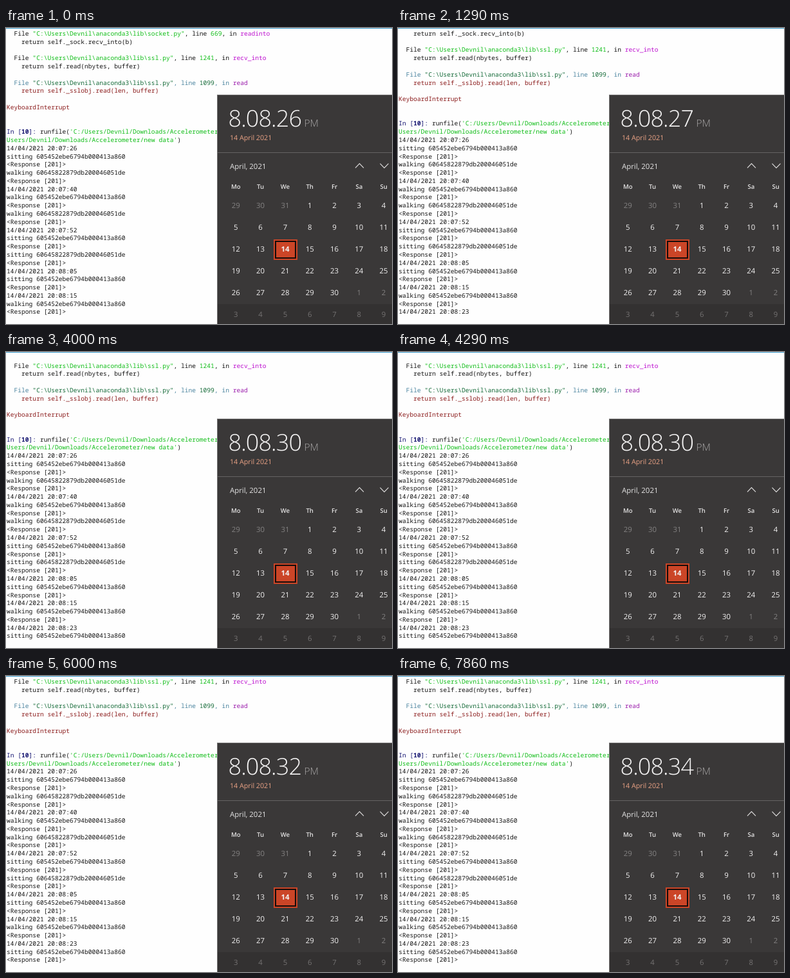
Recreate the animation shown at these times as an HTML page with a canvas. Size 600 by 462 pixels, loop 8000 ms.

```html
<!DOCTYPE html>
<html lang="en">
<head>
<meta charset="utf-8">
<title>Console and calendar</title>
<style>
html, body { margin: 0; width: 100%; height: 100%; overflow: hidden; background: #fefefe; }
canvas { display: block; }
</style>
</head>
<body>
<canvas id="stage" width="600" height="462"></canvas>
<script>
const ctx = document.getElementById('stage').getContext('2d');
ctx.textRendering = 'geometricPrecision';

const LOOP = 8000;
const LINE_HEIGHT = 12.78;
const LAST_BASELINE = 446.4;
const MONO = '9.62px "Noto Sans Mono", monospace';
const SANS = '"Open Sans", sans-serif';
const BLACK = '#151515', GREEN = '#10bd18', PURPLE = '#bd12cf', RED = '#8b1c1c', NAVY = '#10106e';
const PLAIN = { text: BLACK, path: GREEN, name: PURPLE };
const LAST_CALL = { text: '#4b849f', path: '#146a38', name: '#9a1cab' };

// A console line is a list of [text, color, bold] runs.
const plain = (text, color = BLACK) => [[text, color]];
const trace = (file, line, name, style) => [
  ['  File ', style.text],
  [`"C:\\Users\\Devnil\\anaconda3\\lib\\${file}"`, style.path],
  [', line ', style.text], [String(line), style.path],
  [', in ', style.text], [name, style.name]
];

const DEVICE_A = '605452ebe6794b000413a860';
const DEVICE_B = '60645822879db200046051de';
const reading = (time, ...entries) => [
  plain('14/04/2021 20:' + time),
  ...entries.flatMap(entry => [plain(entry), plain('<Response [201]>')])
];

const consoleLines = [
  trace('socket.py', 669, 'readinto', PLAIN),
  plain('    return self._sock.recv_into(b)'),
  [],
  trace('ssl.py', 1241, 'recv_into', PLAIN),
  plain('    return self.read(nbytes, buffer)'),
  [],
  trace('ssl.py', 1099, 'read', LAST_CALL),
  plain('    return self._sslobj.read(len, buffer)', RED),
  [],
  plain('KeyboardInterrupt', RED),
  [], [],
  [['In [', NAVY], ['10', NAVY, true], [']: ', NAVY], ['runfile(', BLACK],
   ["'C:/Users/Devnil/Downloads/Accelerometer", GREEN]],
  [['Users/Devnil/Downloads/Accelerometer/new data\'', GREEN], [')', BLACK]],
  ...reading('07:26', 'sitting ' + DEVICE_A, 'walking ' + DEVICE_B),
  ...reading('07:40', 'walking ' + DEVICE_A, 'walking ' + DEVICE_B),
  ...reading('07:52', 'sitting ' + DEVICE_A, 'sitting ' + DEVICE_B),
  ...reading('08:05', 'sitting ' + DEVICE_A),
  ...reading('08:15', 'walking ' + DEVICE_A),
  ...reading('08:23', 'sitting ' + DEVICE_A)
];
const printTimes = [1000, 3900, 6000];

function write(text, x, y, font, color, align = 'left') {
  ctx.font = font;
  ctx.fillStyle = color;
  ctx.textAlign = align;
  ctx.fillText(text, x, y);
}

function fill(color, x, y, w, h) {
  ctx.fillStyle = color;
  ctx.fillRect(x, y, w, h);
}

function drawConsole(time) {
  const pending = printTimes.filter(at => time < at).length;
  const visible = consoleLines.slice(0, consoleLines.length - pending);
  visible.reverse().forEach((runs, row) => {
    const y = LAST_BASELINE - row * LINE_HEIGHT;
    if (y < 5) return;
    let x = 1;
    for (const [text, color, bold] of runs) {
      write(text, x, y, (bold ? 'bold ' : '') + MONO, color);
      x += ctx.measureText(text).width;
    }
  });
  fill('#3f9dce', 0, 0, 600, 1);
}

function drawChevron(x, y, rise) {
  ctx.beginPath();
  ctx.moveTo(x - 6.5, y + rise);
  ctx.lineTo(x, y - rise);
  ctx.lineTo(x + 6.5, y + rise);
  ctx.strokeStyle = '#dedddd';
  ctx.lineWidth = 1.2;
  ctx.stroke();
}

function drawDays() {
  const columnX = column => 357.3 + column * 38.3;
  ['Mo', 'Tu', 'We', 'Th', 'Fr', 'Sa', 'Su'].forEach((day, column) =>
    write(day, columnX(column), 250.5, '600 9.6px ' + SANS, '#e3e2e2', 'center'));

  fill('#cb4527', 416, 330, 37, 32);
  fill('#160c0a', 418, 332, 33, 28);
  fill('#cb4527', 420, 334, 29, 24);

  for (let cell = 0; cell < 42; cell++) {
    const date = new Date(2021, 2, 29 + cell);
    const row = Math.floor(cell / 7);
    const day = date.getDate();
    const inMonth = date.getMonth() === 3;
    const today = inMonth && day === 14;
    const color = inMonth ? '#f2f1f1' : row === 5 ? '#747272' : '#838181';
    write(day, columnX(cell % 7), 281 + row * 34,
      (today ? 'bold ' : '') + '11.4px ' + SANS, color, 'center');
  }
}

function drawCalendar(time) {
  fill('#777575', 328, 104, 272, 358);
  fill('#3a3838', 329, 105, 271, 357);
  fill('#333131', 329, 431, 271, 31);

  const seconds = 26 + Math.floor((time + 420) / 1000);
  ctx.letterSpacing = '-0.9px';
  write('8.08.' + seconds, 345.5, 154.3, '300 36px ' + SANS, '#f5f4f4');
  ctx.letterSpacing = '0px';
  write('PM', 463.5, 154.3, '300 15.5px ' + SANS, '#aaa8a8');
  write('14 April 2021', 348, 175, '10.7px ' + SANS, '#eda486');
  fill('#656363', 329, 194, 271, 1);

  write('April, 2021', 348, 219.5, '11.4px ' + SANS, '#e6e5e5');
  drawChevron(549.5, 215, 3.3);
  drawChevron(588, 215, -3.3);
  drawDays();
}

function draw(now) {
  const time = now % LOOP;
  fill('#fefefe', 0, 0, 600, 462);
  drawConsole(time);
  drawCalendar(time);
  requestAnimationFrame(draw);
}
requestAnimationFrame(draw);
</script>
</body>
</html>
```
